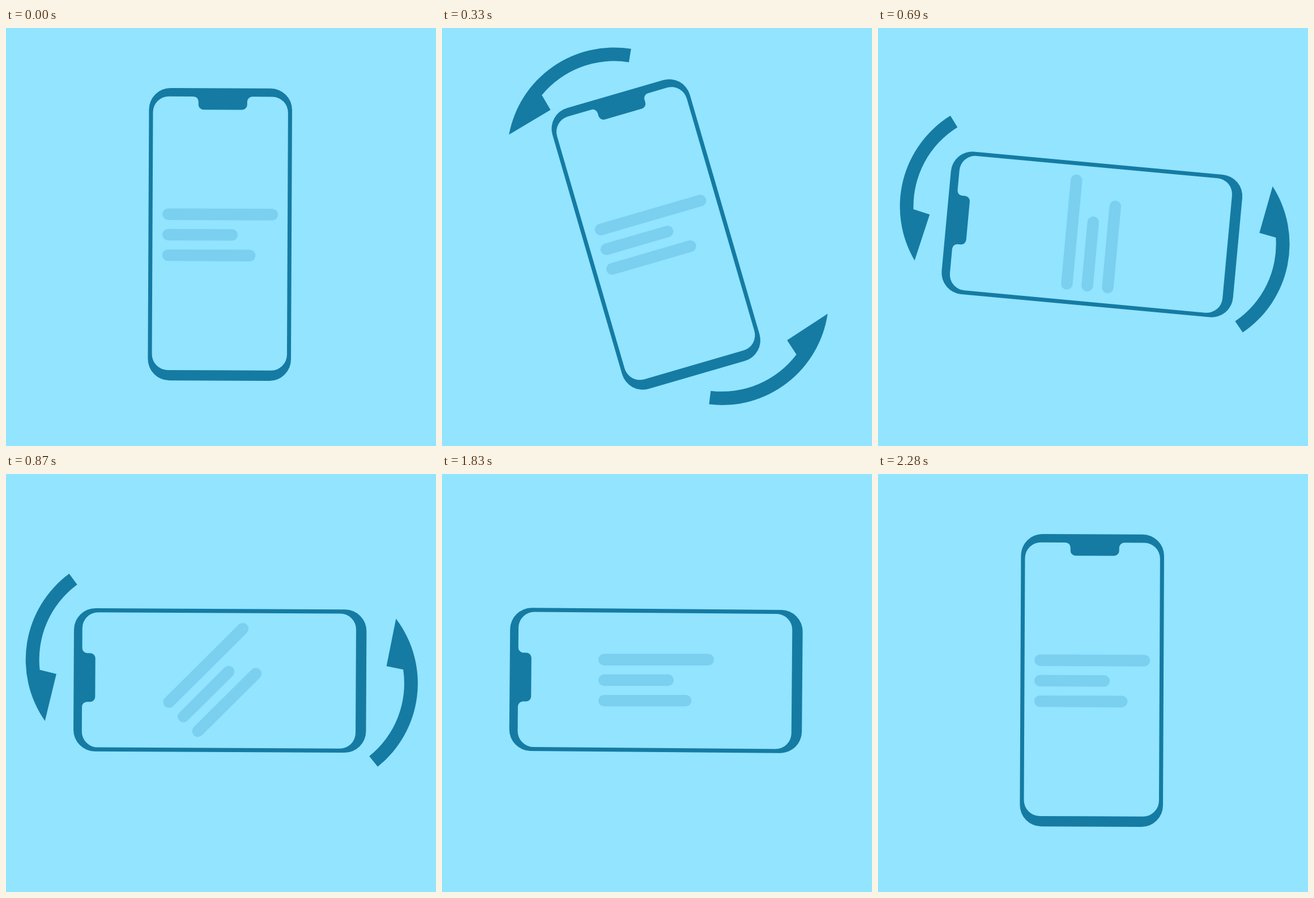
Animation, 759 px wide and 738 px high, one loop 2.31 s. Source, as an HTML page with a canvas:

```html
<!DOCTYPE html>
<html lang="en">
<head>
<meta charset="utf-8">
<title>Rotating phone</title>
<style>
html, body { margin: 0; width: 100%; height: 100%; overflow: hidden; background: #92e4ff; }
canvas { display: block; }
</style>
</head>
<body>
<canvas id="stage" width="759" height="738"></canvas>
<script>
const ctx = document.getElementById('stage').getContext('2d');
const LOOP = 2310, STEP = 30;
const SKY = '#92e4ff', INK = '#157ba3', BAR = '#7bd0f0';
const TILT = 0.26, QUARTER = -89.96;

const rad = deg => deg * Math.PI / 180;
const ramp = (t, a, b) => Math.min(1, Math.max(0, (t - a) / (b - a)));

// Ease in and out along a cubic Bezier with flat ends
function ease(x) {
  let lo = 0, hi = 1, s = 0.5;
  for (let i = 0; i < 24; i++) {
    s = (lo + hi) / 2;
    const w = 1 - s;
    if (3 * s * w * (w * 0.346 + s * 0.29) + s ** 3 < x) lo = s;
    else hi = s;
  }
  return s * s * (3 - 2 * s);
}

function turned(x, y, deg, draw) {
  ctx.save();
  ctx.translate(x, y);
  ctx.rotate(rad(deg));
  draw();
  ctx.restore();
}

function drawPhone() {
  ctx.fillStyle = INK;
  ctx.beginPath();
  ctx.roundRect(-126.3, -258.2, 252.6, 516.4, 38);
  ctx.fill();

  // Screen, with the notch cut into its top edge
  const x = 119.2, top = -243.4, bottom = 239.8, r = 28;
  const left = -39, right = 47, low = -220.2, n = 9;
  ctx.fillStyle = SKY;
  ctx.beginPath();
  ctx.moveTo(0, bottom);
  ctx.arcTo(-x, bottom, -x, 0, r);
  ctx.arcTo(-x, top, left, top, r);
  ctx.arcTo(left, top, left, low, n);
  ctx.arcTo(left, low, right, low, n);
  ctx.arcTo(right, low, right, top, n);
  ctx.arcTo(right, top, x, top, n);
  ctx.arcTo(x, top, x, 0, r);
  ctx.arcTo(x, bottom, 0, bottom, r);
  ctx.closePath();
  ctx.fill();
}

function drawBars() {
  ctx.fillStyle = BAR;
  [204, 133, 164.5].forEach((w, i) => {
    ctx.beginPath();
    ctx.roundRect(-101, -45.6 + i * 36.2, w, 20.4, 10.2);
    ctx.fill();
  });
}

// Curved arrow around its own centre, with a flat-topped head
function drawArrow() {
  const outer = 188.5, inner = 164.6, heel = 56, tail = rad(130);
  const tip = rad(41.4);
  ctx.beginPath();
  ctx.arc(0, 0, outer, tail, tip, true);
  ctx.lineTo(heel, outer * Math.sin(tip));
  ctx.arc(0, 0, inner, Math.acos(heel / inner), tail);
  ctx.closePath();
  ctx.fill();
}

function drawArrows() {
  ctx.fillStyle = INK;
  turned(30.7, 146.9, 0, drawArrow);
  turned(9.7, -170.3, 182.3, drawArrow);
}

// A quick swing that dies away over a slow steady drift
function arrowAngle(t) {
  const swing = 1 - (1 - ramp(t, 180, 690)) ** 2.3;
  return 10 - 71.3 * swing - 23.4 * ramp(t, 180, 1110);
}

function render(t) {
  const out = ease(ramp(t, 180, 870));
  const back = ease(ramp(t, 1818, 2280));
  const upright = ease(ramp(t, 750, 1080));
  const phone = TILT + QUARTER * (out - back);
  const bars = (TILT + QUARTER * out) * (1 - upright) + TILT * back;
  const lift = -1.4 * (upright - back);

  ctx.fillStyle = SKY;
  ctx.fillRect(0, 0, 759, 738);
  turned(377.7, 364.5, phone, drawPhone);
  turned(377, 364.5 + lift, bars, drawBars);
  ctx.globalAlpha = ramp(t, 150, 210) * (1 - ramp(t, 1050, 1140));
  turned(388.3, 370.9, arrowAngle(t), drawArrows);
  ctx.globalAlpha = 1;
}

const start = performance.now();
function tick() {
  const t = Math.max(0, performance.now() - start) % LOOP;
  render(Math.floor(t / STEP) * STEP);
  requestAnimationFrame(tick);
}
tick();
</script>
</body>
</html>
```
